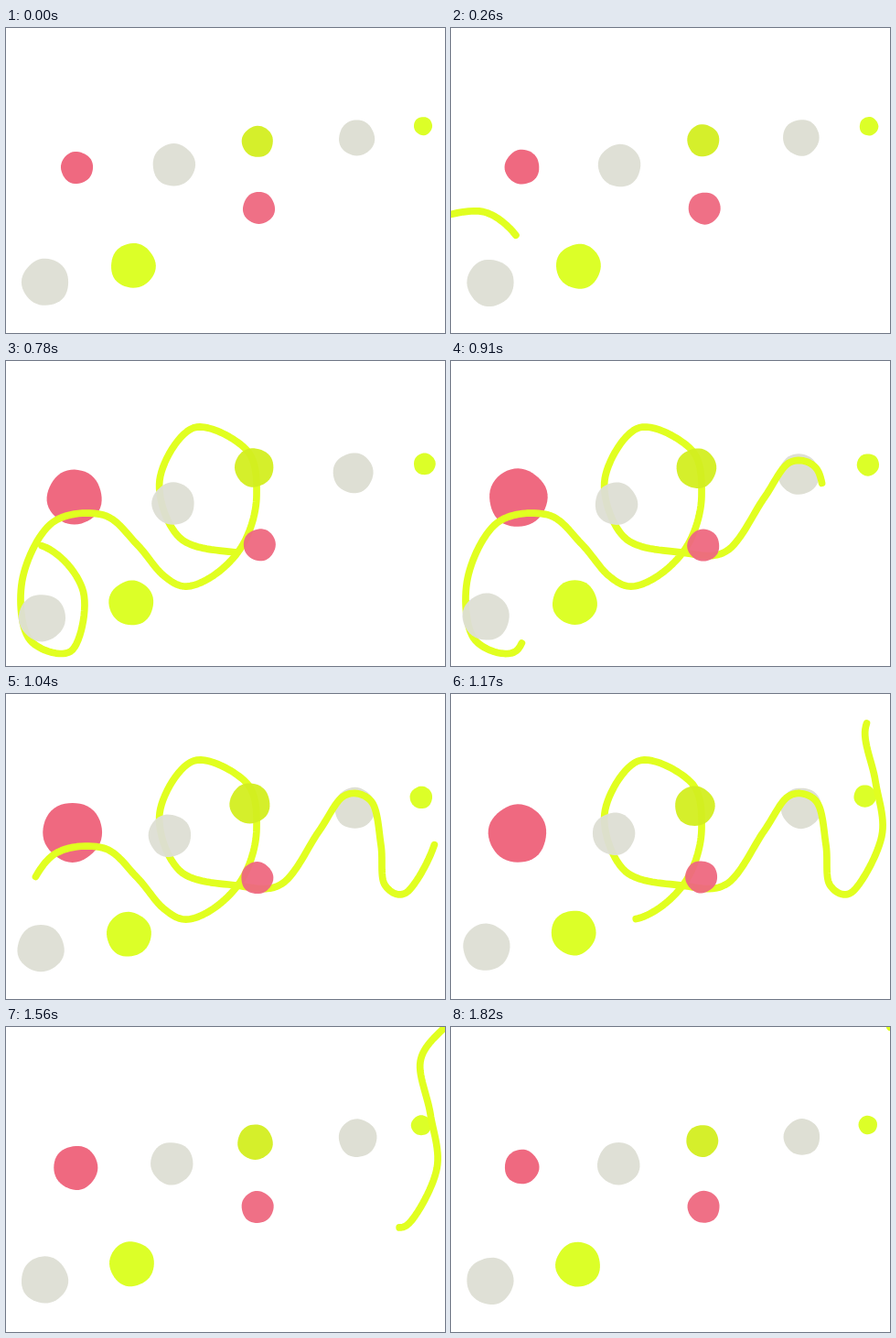
An HTML page with a canvas for the animation above (1.95 s loop, 480x333 px).

```html
<!DOCTYPE html>
<html lang="en">
<head>
<meta charset="utf-8">
<title>Dots and ribbon</title>
<style>
  html, body { margin: 0; width: 100%; height: 100%; overflow: hidden; background: #fff; }
  canvas { display: block; }
</style>
</head>
<body>
<canvas id="stage" width="480" height="333"></canvas>
<script>
const ctx = document.getElementById('stage').getContext('2d');
const STEP = 130, STEPS = 15, TAU = Math.PI * 2;
const GREY = '#dedfd4', PINK = '#ef6980', LIME = '#dcff28', OLIVE = '#d3ef20';

// Each dot swells by `grow` and runs once round a small circle (negative orbit: anticlockwise).
const dot = (color, x, y, radius, orbit, angle, grow = 0) => ({ color, x, y, radius, orbit, angle, grow });
const behind = [
  dot(PINK, 77.5, 152.5, 17.4, -2.6, .5, 15),
  dot(LIME, 139, 259.5, 24.4, 2.8, -.7),
  dot(GREY, 383.5, 120, 19.5, -2.5, -1, 2.9),
  dot(LIME, 456, 107, 10, 3.2, -1.4, 2.2)
];
const front = [
  dot(GREY, 43, 277.5, 25.6, 2.5, -.2),
  dot(GREY, 183.5, 149.5, 23.2, 3.5, -1),
  dot(OLIVE, 275, 124, 17, -4.8, .65, 5),
  dot(PINK, 276.5, 196.5, 17.5, 2.4, -1.3)
];

// Turning points of the ribbon.
const knots = [
  [-40, 214], [37, 201], [84, 250], [72, 316], [25, 303], [18, 238], [50, 177], [106, 168],
  [143, 200], [172, 234], [199, 246], [234, 229], [262, 195], [274, 147], [263, 97], [205, 73],
  [168, 130], [190, 193], [252, 209], [302, 207], [342, 150], [370, 111], [400, 118], [410, 165],
  [414, 208], [440, 215], [471, 155], [464, 95], [453, 38], [478, 2], [510, -20]
];
const xs = knots.map(k => k[0]), ys = knots.map(k => k[1]);
// Knots passed after every second step; the tail repeats the head's run a little later.
const pace = [0, 1.6, 7, 18, 25.85, 29.5, 30];
const TAIL_LAG = 4.38;

// Catmull-Rom interpolation of a list at position u.
function spline(list, u) {
  const last = list.length - 1;
  u = Math.max(0, Math.min(last, u));
  const i = Math.min(Math.floor(u), last - 1), t = u - i;
  const a = list[Math.max(0, i - 1)], b = list[i], c = list[i + 1], d = list[Math.min(last, i + 2)];
  return b + .5 * t * (c - a + t * (2 * a - 5 * b + 4 * c - d + t * (3 * (b - c) + d - a)));
}

function drawRibbon(step) {
  const from = spline(pace, (step - TAIL_LAG) / 2), to = spline(pace, step / 2);
  ctx.beginPath();
  const n = Math.ceil((to - from) * 14);
  for (let i = 0; i <= n; i++) {
    const u = from + (to - from) * i / (n || 1);
    ctx.lineTo(spline(xs, u), spline(ys, u));
  }
  ctx.strokeStyle = '#e1ff20';
  ctx.lineWidth = 7.7;
  ctx.lineCap = ctx.lineJoin = 'round';
  ctx.stroke();
}

function drawDot({ color, x, y, radius, orbit, angle, grow }, step) {
  const p = step / STEPS;
  const turn = angle + Math.sign(orbit) * TAU * p * p * (3 - 2 * p);
  const size = Math.abs(orbit);
  const cx = x + size * (Math.cos(turn) - Math.cos(angle));
  const cy = y + size * (Math.sin(turn) - Math.sin(angle));
  const r = radius + grow * (1 - Math.cos(TAU * p - .2)) / 2;
  const seed = x + step * 1.7;
  ctx.beginPath();
  for (let a = 0; a < TAU; a += TAU / 48) {
    const rough = r * (1 + .012 * Math.sin(3 * a + seed) + .01 * Math.sin(5 * a + seed * 2));
    ctx.lineTo(cx + rough * Math.cos(a), cy + rough * Math.sin(a));
  }
  ctx.fillStyle = color;
  ctx.fill();
}

function render(now) {
  const step = Math.floor(now / STEP) % STEPS;
  ctx.clearRect(0, 0, 480, 333);
  behind.forEach(d => drawDot(d, step));
  drawRibbon(step);
  ctx.globalAlpha = .95;
  front.forEach(d => drawDot(d, step));
  ctx.globalAlpha = 1;
}

const start = performance.now();
function tick() {
  render(performance.now() - start);
  requestAnimationFrame(tick);
}
tick();
</script>
</body>
</html>
```
